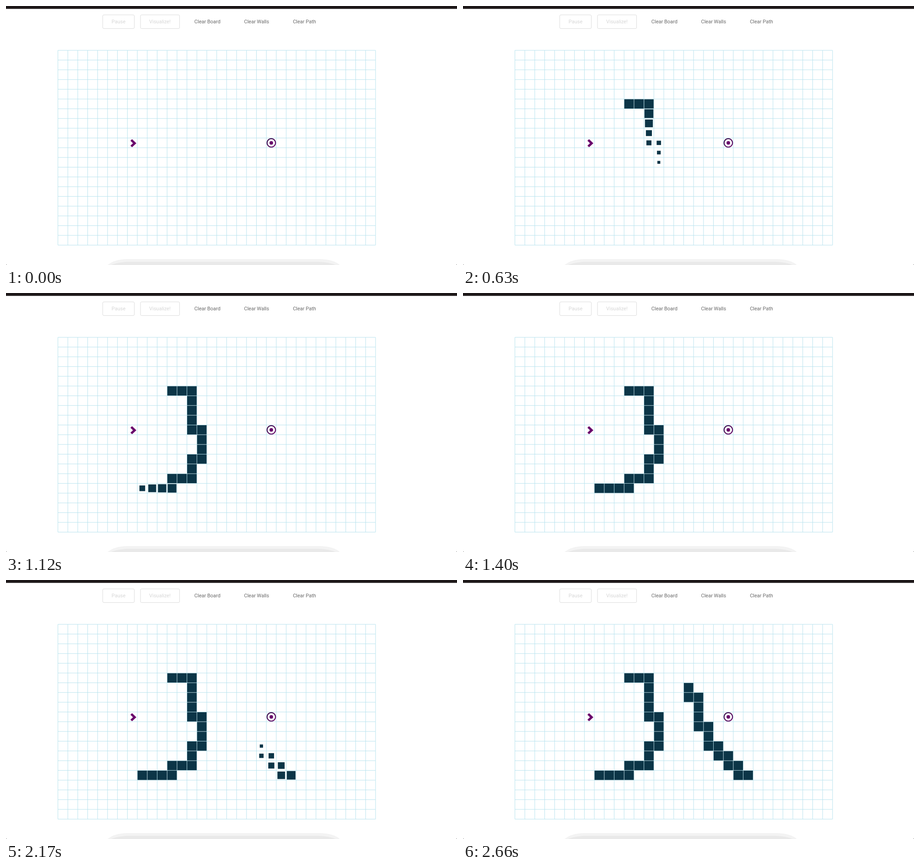
An HTML page for the animation above (2870 ms loop, 986 by 568 pixels).

```html
<!DOCTYPE html>
<html lang="en">
<head>
<meta charset="utf-8">
<title>Pathfinding board</title>
<style>
  html, body { margin: 0; width: 100%; height: 100%; overflow: hidden; background: #fff; }
  svg { display: block; width: 986px; height: 568px; }
  text { font: 11px Roboto, sans-serif; fill: #696969; }
  .off { fill: #d6d6d6; }
  .button { fill: none; stroke: #dcdcdc; }
  #grid { fill: none; stroke: #b9e3ee; }
  #walls { fill: #0c3547; }
</style>
</head>
<body>
<svg viewBox="0 0 986 568">
  <defs>
    <linearGradient id="ring" x1="0" y1="0" x2="1" y2="1">
      <stop offset="0" stop-color="#35104a"/>
      <stop offset="1" stop-color="#6a0a6c"/>
    </linearGradient>
  </defs>
  <rect width="986" height="6.3" fill="#1d1819"/>

  <rect class="button" x="211.5" y="19.5" width="69" height="30" rx="2.5"/>
  <rect class="button" x="294" y="19.5" width="85.5" height="30" rx="2.5"/>
  <text class="off" x="230.8" y="38">Pause</text>
  <text class="off" x="313" y="38">Visualize!</text>
  <text x="411.8" y="38">Clear Board</text>
  <text x="520.5" y="38">Clear Walls</text>
  <text x="627.2" y="38">Clear Path</text>

  <path id="grid"/>
  <g id="walls"></g>

  <path d="M275.6 292 285 300.9 275.6 309.7 272 306.3 277.6 300.9 272 295.4Z" fill="#6a0a6c"/>
  <circle cx="580" cy="300.2" r="9.3" fill="none" stroke="url(#ring)" stroke-width="2.2"/>
  <circle cx="580" cy="300.2" r="3.9" fill="#6a0a6c"/>

  <path d="M222 568Q236 556 264 555H688Q716 556 730 568Z" fill="#f3f3f3"/>
  <path d="M230 568Q246 561.5 270 561H682Q706 561.5 721 568Z" fill="#e9e9e9"/>
  <path d="M0 565.5Q0 568 2.5 568H0ZM986 565.5Q986 568 983.5 568H986Z" fill="#555"/>
</svg>
<script>
const LOOP = 2870, TICK = 70, GROW = 300;
const COLS = 32, ROWS = 20, X0 = 113.5, Y0 = 97.2, CW = 21.7, CH = 21.36;
const STEP = { L: [-1, 0], R: [1, 0], U: [0, -1], D: [0, 1] };

// Each stroke: first cell, moves from cell to cell, time each cell is touched.
const strokes = [
  { col: 11, row: 5, moves: 'RRDDDDRDDDLDDLLDLLL',
    times: [205, 290, 360, 402, 459, 534, 565, 586, 606, 628,
            686, 720, 737, 775, 788, 838, 902, 926, 949, 1032] },
  { col: 23, row: 15, moves: 'LULULULUULUUULU',
    times: [1956, 2010, 2045, 2070, 2092, 2125, 2158, 2186,
            2195, 2217, 2242, 2253, 2277, 2307, 2328, 2342] }
];

let lines = '';
for (let c = 0; c <= COLS; c++) lines += `M${X0 + c * CW} ${Y0}v${ROWS * CH}`;
for (let r = 0; r <= ROWS; r++) lines += `M${X0} ${Y0 + r * CH}h${COLS * CW}`;
document.getElementById('grid').setAttribute('d', lines);

const layer = document.getElementById('walls');
const walls = [];

function addWall(col, row, start) {
  const el = document.createElementNS('http://www.w3.org/2000/svg', 'rect');
  const w = CW - 0.9, h = CH - 0.9;
  Object.entries({ x: -w / 2, y: -h / 2, width: w, height: h })
    .forEach(([name, value]) => el.setAttribute(name, value));
  layer.append(el);
  walls.push({ el, start, x: X0 + (col + 0.5) * CW, y: Y0 + (row + 0.5) * CH });
}

for (const { col, row, moves, times } of strokes) {
  let c = col, r = row;
  addWall(c, r, times[0]);
  [...moves].forEach((m, i) => {
    c += STEP[m][0];
    r += STEP[m][1];
    addWall(c, r, times[i + 1]);
  });
}

// cubic-bezier(0, 0, .58, 1)
function easeOut(x) {
  if (x >= 1) return 1;
  let lo = 0, hi = 1;
  for (let i = 0; i < 20; i++) {
    const s = (lo + hi) / 2;
    if (s * s * (1.74 - 0.74 * s) < x) lo = s; else hi = s;
  }
  return lo * lo * (3 - 2 * lo);
}

function draw(now) {
  const t = Math.floor((now % LOOP) / TICK) * TICK;
  for (const { el, start, x, y } of walls) {
    const age = (t - start) / GROW;
    const scale = age < 0 ? 0 : 0.3 + 0.7 * easeOut(age);
    el.setAttribute('visibility', scale ? 'visible' : 'hidden');
    el.setAttribute('transform', `translate(${x} ${y}) scale(${scale})`);
  }
}

const begin = performance.now();
function frame() {
  draw(performance.now() - begin);
  requestAnimationFrame(frame);
}
frame();
</script>
</body>
</html>
```
